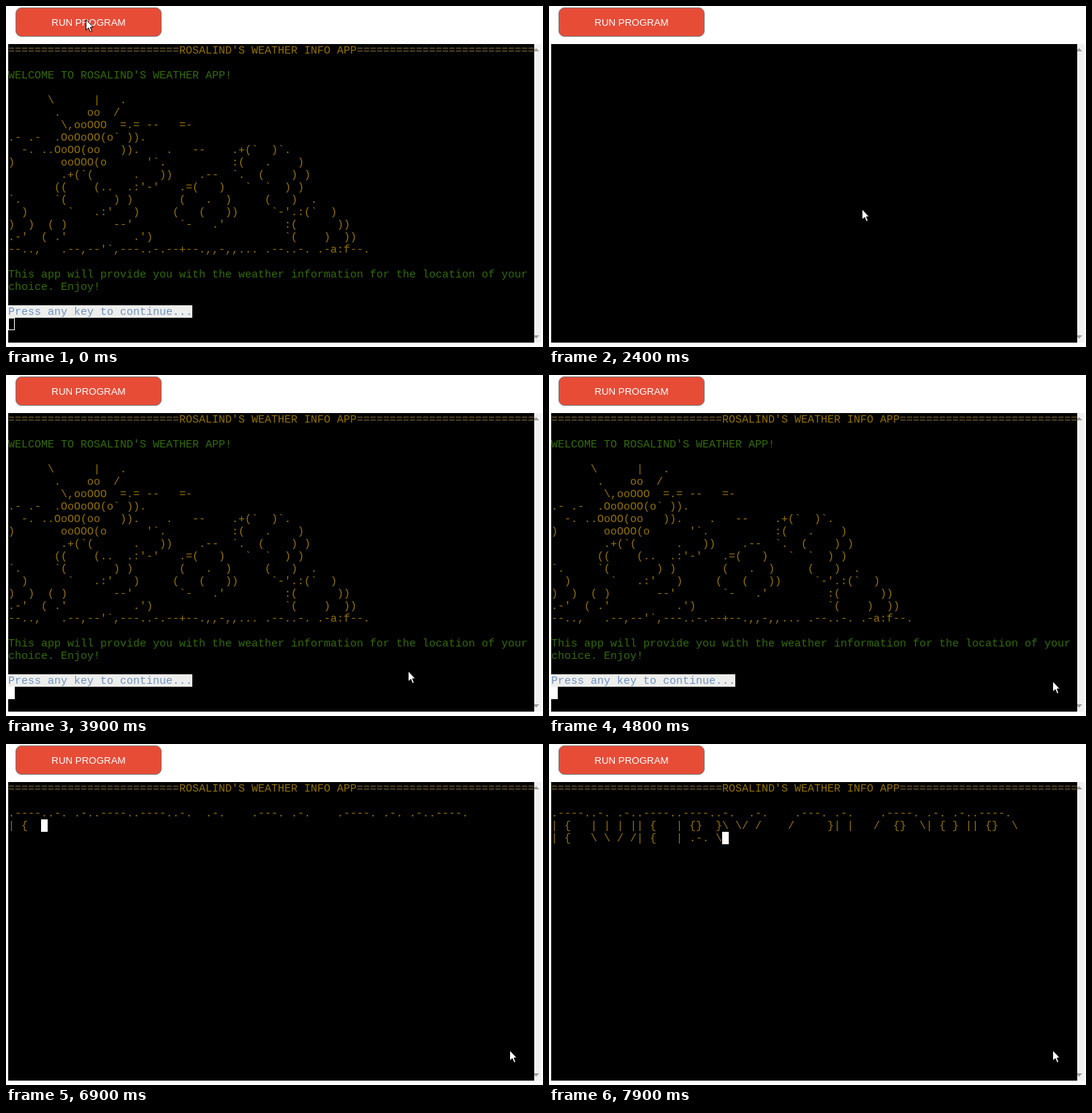
Recreate the animation shown at these times as an HTML page. Size 735x466 px, loop 8 s.

```html
<!DOCTYPE html>
<html lang="en">
<head>
<meta charset="utf-8">
<title>Weather terminal</title>
<style>
  html, body { margin: 0; width: 100%; height: 100%; overflow: hidden; background: #fff; }
  body { position: relative; }
  body > *, #term > * { position: absolute; }
  #run {
    left: 13px; top: 2px; width: 200px; height: 40px; box-sizing: border-box;
    border: 1px solid #7b7b7b; border-radius: 8px; background: #e74c37; color: #fff;
    font: 13.333px/39px "Liberation Sans", Arial, sans-serif; text-align: center;
  }
  #bar { left: 716px; top: 52px; }
  #term { left: 3px; top: 52px; width: 720px; height: 408px; background: #000; overflow: hidden; }
  pre {
    margin: 0; padding-top: 1px; left: 0; top: calc(var(--r) * 17px); color: #927200;
    font: 15px/17px "Liberation Mono", "Courier New", monospace;
  }
  .rule { color: #7c6836; }
  .green { color: #336b04; }
  .key { background: #eeeeec; color: #6e92c4; height: 16px; }
  #caret { width: 9px; height: 17px; box-sizing: border-box; border: 1px solid #fff; }
  #mouse { left: 0; top: 0; }
</style>
</head>
<body>
<div id="run">RUN PROGRAM</div>
<svg id="bar" width="17" height="408">
  <path d="M0 0H17V408H0Z" fill="#f1f1f1"/>
  <path d="M5 10L9.500 5.500L14 10ZM5 398H14L9.500 402.500Z" fill="#a0a0a0"/>
</svg>
<div id="term">
<pre id="head" style="--r:0"><span class="rule">==========================</span>ROSALIND'S WEATHER INFO APP<span class="rule">===========================</span></pre>
<pre class="intro green" style="--r:2">WELCOME TO ROSALIND'S WEATHER APP!</pre>
<pre class="intro" style="--r:4">      \      |   .
       .    oo  /
        \,ooOOO  =.= --   =-
.- .-  .OoOoOO(o` )).
  -. ..OoOO(oo   )).    .   --    .+(`  )`.
)       ooOOO(o      '`.          :(   .    )
        .+(`(      .   ))    .--  `.  (    ) )
       ((    (..  .:'-'   .=(   )   `  `  ) )
`.     `(       ) )       (   .  )     (   )  .
  )      `   .:'   )     (   (   ))     `-'.:(`  )
)  )  ( )       --'       `-   .'         :(      ))
.-'  ( .'          .')                    `(    )  ))
--..,   .--,--'`,---..-.--+--.,,-,,... .--..-. .-a:f--.</pre>
<pre class="intro green" style="--r:18">This app will provide you with the weather information for the location of your
choice. Enjoy!</pre>
<pre class="intro key" style="--r:21">Press any key to continue...</pre>
<pre id="typed" style="--r:2"></pre>
<div id="caret"></div>
</div>
<svg id="mouse" width="12" height="19">
  <path d="M.5 .6V15L4 11.800L6.300 17.400L8.700 16.400L6.400 11H10.400Z" fill="#fff" stroke="#000"/>
</svg>
<script>
const $ = id => document.getElementById(id);
const intro = document.querySelectorAll('.intro');

const banner = [
  '.----..-. .-..----..----..-.  .-.    .---. .-.    .----. .-. .-..----.',
  '| {   | | | || {   | {}  }\\ \\/ /    /     }| |   /  {}  \\| { } || {}  \\',
  '| {   \\ \\ / /| {   | .-. \\'
].join('\n');

// [time, value, ...] rows, linear in between
const typing = [[6100, 6], [6900, 76], [7800, 158], [7900, 169]];
const path = [
  [1200, 109, 18], [1300, 107, 18], [2000, 107, 18], [2500, 508, 342],
  [3600, 508, 342], [3900, 550, 404], [4000, 546, 420], [4200, 529, 418],
  [4500, 529, 418], [4700, 630, 413], [4800, 689, 418]
];

function sample(keys, t) {
  const i = keys.findIndex(k => k[0] > t);
  if (i === 0) return keys[0].slice(1);
  if (i < 0) return keys[keys.length - 1].slice(1);
  const a = keys[i - 1], b = keys[i], p = (t - a[0]) / (b[0] - a[0]);
  return a.slice(1).map((v, j) => Math.round(v + (b[j + 1] - v) * p));
}

const show = (el, on) => el.style.visibility = on ? 'visible' : 'hidden';
const move = (el, x, y) => el.style.transform = `translate(${x}px,${y}px)`;

function draw(now) {
  const t = Math.floor(now % 8000 / 100) * 100;
  const blank = t >= 1600 && t < 2800, typingNow = t >= 6100;
  show($('head'), !blank);
  intro.forEach(el => show(el, !blank && !typingNow));

  const text = typingNow ? banner.slice(0, sample(typing, t)[0]) : '';
  $('typed').textContent = text;

  let row = blank ? 0 : 22, col = 0;
  if (typingNow) {
    const lines = text.split('\n');
    row = lines.length + 1;
    col = lines[lines.length - 1].length;
  }
  const caret = $('caret');
  caret.style.background = t < 1600 ? 'none' : '#fff';
  show(caret, !blank || t < 1700);
  move(caret, col * 9, row * 17);

  move($('mouse'), ...sample(path, t));
  requestAnimationFrame(draw);
}
requestAnimationFrame(draw);
</script>
</body>
</html>
```
